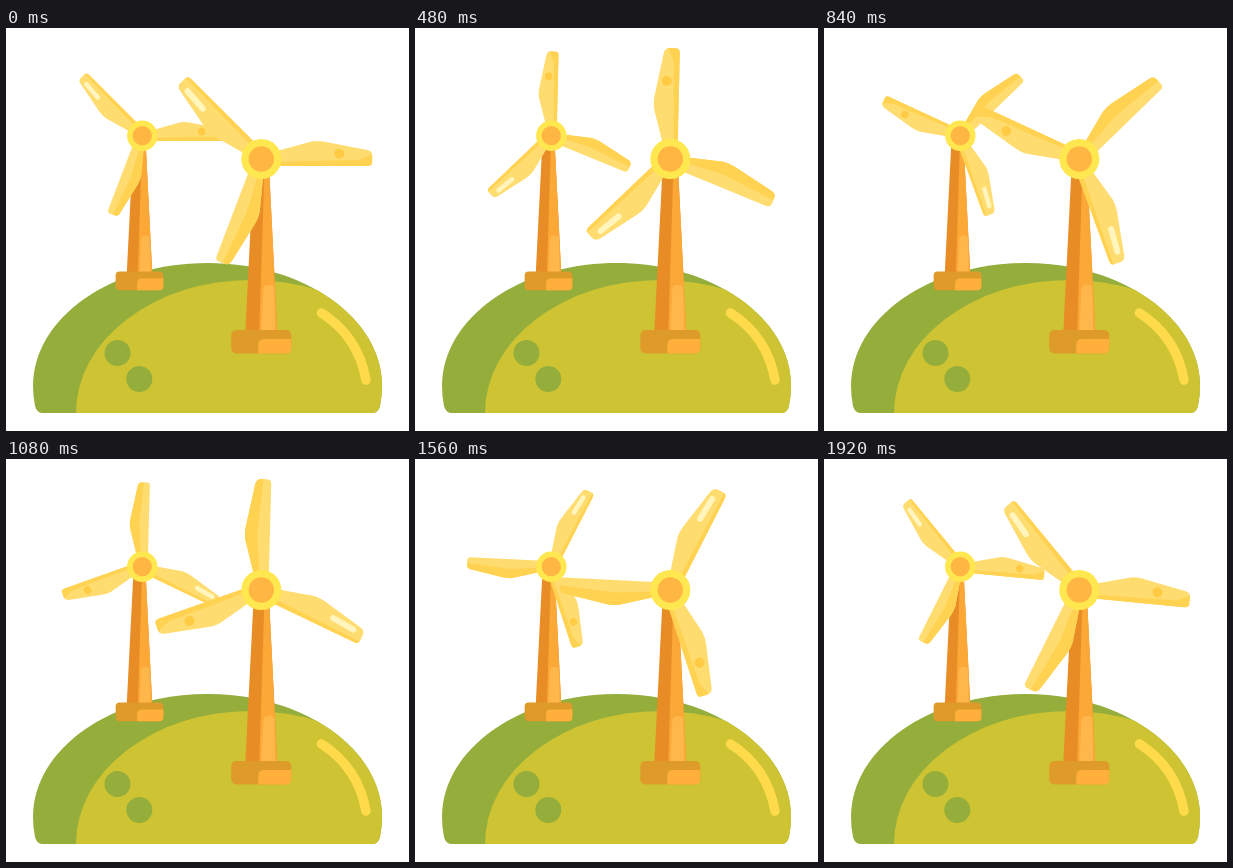
Animation, 403 px wide and 403 px high, one loop 2 s. Source, as an HTML page:

```html
<!DOCTYPE html>
<html lang="en">
<head>
<meta charset="utf-8">
<title>Wind turbines</title>
<style>
  html, body { margin: 0; width: 100%; height: 100%; overflow: hidden; background: #fff; }
  svg { display: block; width: 100vw; height: 100vh; }
</style>
</head>
<body>
<svg viewBox="0 0 403 403">
  <defs>
    <path id="blade" d="M12-7 L22-10 L50-18 Q56-19 62-18 L106-10 Q111-9 111-4 V2 Q111 6 106 6 L12 7Z"/>
    <clipPath id="bladeClip"><use href="#blade"/></clipPath>

    <path id="hill" d="M27 358 C27 290 105 235 201.500 235 S376 290 376 358 Q376 368 374 378 Q372 385 367 385 H36 Q31 385 29 378 Q27 368 27 358Z"/>
    <clipPath id="hillClip"><use href="#hill"/></clipPath>

    <!-- Tower and rotor both have the hub at their origin. -->
    <g id="tower">
      <path fill="#e88c25" d="M-8 14 H8 L16 173 H-16Z"/>
      <path fill="#fba837" d="M3 14 H8 L16 173 H-2Z"/>
      <path fill="#ffb74c" d="M2 131 Q2 126 7 126 H9 Q13 126 13 131 L14 173 H0Z"/>
      <rect x="-30" y="171" width="60" height="23.500" rx="5" fill="#de9b29"/>
      <path fill="#ffb03c" d="M-3 194.500 V186 Q-3 180 3 180 H30 V189.500 Q30 194.500 25 194.500Z"/>
    </g>

    <g id="rotor">
      <g id="blades">
        <g transform="rotate(225.500)">
          <use href="#blade" fill="#ffdc70"/>
          <path clip-path="url(#bladeClip)" fill="#ffd252" d="M12 2 L111 3 V8 H12Z"/>
          <path d="M77-6.500 L100-5" stroke="#fff5bd" stroke-width="6" stroke-linecap="round"/>
        </g>
        <g transform="rotate(0.500)">
          <use href="#blade" fill="#ffdc70"/>
          <path clip-path="url(#bladeClip)" fill="#ffd252" d="M12 3 L98 0 L111-6 V8 H12Z"/>
          <circle cx="78" cy="-6" r="5" fill="#ffcb45"/>
        </g>
        <g transform="rotate(111.500)">
          <use href="#blade" fill="#ffdc70"/>
          <path clip-path="url(#bladeClip)" fill="#ffd252" d="M12-2 L55-6 L111-2 V-20 H12Z"/>
        </g>
      </g>
      <circle r="20" fill="#ffe74f"/>
      <circle r="12.700" fill="#ffb643"/>
    </g>
  </defs>

  <use href="#hill" fill="#94ad3b"/>
  <ellipse cx="245" cy="385" rx="175" ry="133" fill="#cec433" clip-path="url(#hillClip)"/>
  <g fill="#94ad3b">
    <circle cx="111.500" cy="325" r="13"/>
    <circle cx="133.300" cy="351" r="13"/>
  </g>
  <path d="M315.500 285 Q352 308 360 352" fill="none" stroke="#ffdb4b" stroke-width="9.500" stroke-linecap="round"/>

  <use href="#tower" transform="translate(133.500 107.500) scale(.795)"/>
  <use href="#rotor" transform="translate(136.300 107.700) scale(.76)"/>
  <use href="#tower" transform="translate(255.300 131)"/>
  <use href="#rotor" transform="translate(255.300 131)"/>
</svg>
<script>
  const LOOP_MS = 2000, STEP_MS = 120, STEP_DEGREES = -22.15;
  const blades = document.getElementById('blades');

  function draw(now) {
    const step = Math.floor((now % LOOP_MS) / STEP_MS);
    blades.setAttribute('transform', `rotate(${step * STEP_DEGREES})`);
    requestAnimationFrame(draw);
  }
  draw(performance.now());
</script>
</body>
</html>
```
